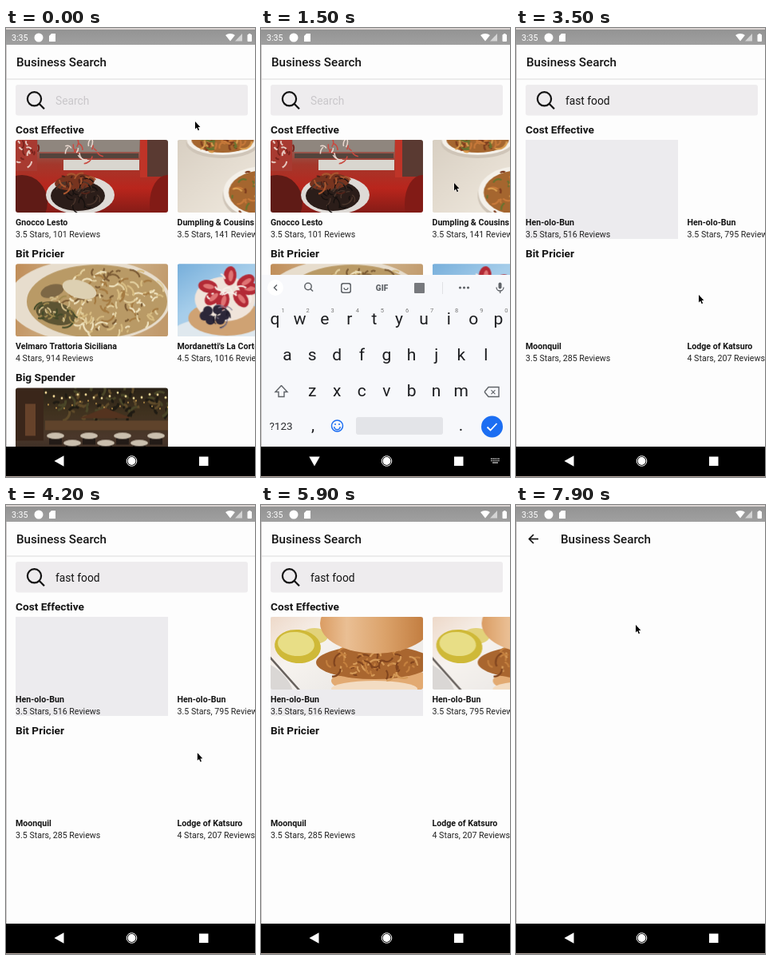
An HTML page with a canvas for the animation above (8000 ms loop, 312 by 562 pixels).

```html
<!DOCTYPE html>
<html lang="en">
<head>
<meta charset="utf-8">
<title>Business Search</title>
<style>
html, body { margin: 0; width: 100%; height: 100%; overflow: hidden; background: #fdfdfd; }
canvas { display: block; width: 312px; height: 562px; }
</style>
</head>
<body>
<canvas id="stage" width="312" height="562"></canvas>
<script>
let c = document.getElementById('stage').getContext('2d');
const LOOP = 8000;
const QUERY = 'fast food';
const INK = '#141414', GRAY = '#5f6368', BLUE = '#1c6ef2', PAGE = '#fdfdfd';
const PHOTO_W = 191, PHOTO_H = 91;
const CARD_X = [12, 214.5], ROW_TOP = 140, ROW_STEP = 155.2;

// Moments in ms.
const KEYBOARD_IN = 800, TYPING = 1530, KEYBOARD_OUT = 2450;
const NEW_RESULTS = 3100, PHOTOS_LOADED = 4300, PAGE_CHANGE = 7400;

const clamp = v => Math.max(0, Math.min(1, v));
const ramp = (t, from, to) => clamp((t - from) / (to - from));
const ease = v => v * v * (3 - 2 * v);
const repeat = (n, fn) => { for (let i = 0; i < n; i++) fn(i); };

function rect(x, y, w, h, color, radius = 0) {
  c.fillStyle = color;
  c.beginPath();
  c.roundRect(x, y, w, h, radius);
  c.fill();
}
function blob(x, y, rx, ry, color, angle = 0) {
  c.fillStyle = color;
  c.beginPath();
  c.ellipse(x, y, rx, ry, angle, 0, 7);
  c.fill();
}
function dot(x, y, r, color) {
  blob(x, y, r, r, color);
}
function trace(points) {
  c.beginPath();
  for (let i = 0; i < points.length; i += 2) c.lineTo(points[i], points[i + 1]);
}
function poly(color, ...points) {
  c.fillStyle = color;
  trace(points);
  c.fill();
}
function line(color, width, ...points) {
  c.strokeStyle = color;
  c.lineWidth = width;
  trace(points);
  c.stroke();
}
function ring(x, y, r, color, width, from = 0, to = 7) {
  c.strokeStyle = color;
  c.lineWidth = width;
  c.beginPath();
  c.arc(x, y, r, from, to);
  c.stroke();
}
function text(s, x, y, size, weight = 400, color = INK, align = 'left') {
  c.font = `${weight} ${size}px Roboto, sans-serif`;
  c.fillStyle = color;
  c.textAlign = align;
  c.fillText(s, x, y);
}
function fade(x, y, ...colors) {
  const g = c.createLinearGradient(0, 0, x, y);
  colors.forEach((color, i) => g.addColorStop(i / (colors.length - 1), color));
  return g;
}
function seeded(seed) {
  return () => (seed = (seed * 16807) % 2147483647) / 2147483647;
}
// Loose curls scattered inside an ellipse.
function strands(count, x, y, rx, ry, colors, width) {
  const rnd = seeded(count * 31 + x);
  repeat(count, i => {
    const a = rnd() * 6.3, d = Math.sqrt(rnd()), start = rnd() * 6.3;
    ring(x + Math.cos(a) * d * rx, y + Math.sin(a) * d * ry, 3 + rnd() * 9,
      colors[i % colors.length], width, start, start + 0.8 + rnd());
  });
}
function backdrop(...args) {
  rect(-9, -9, PHOTO_W + 18, PHOTO_H + 18, fade(...args));
}

const photoScenes = {
  redTable() {
    backdrop(0, PHOTO_H, '#8a756c', '#a3382c', '#b9251c', '#851c17');
    rect(28, -9, 127, 24, '#8f867e');
    rect(30, 17, 124, 6, '#54443c');
    rect(60, 25, 95, 13, '#d9d6cf');
    rect(-9, -9, 36, 48, '#a83a31');
    strands(16, 10, 14, 14, 16, ['#e5c6bd', '#7a241d'], 2);
    strands(16, 88, 10, 26, 9, ['#c94a40', '#ead9d0'], 1.5);
    rect(165, -9, 36, 55, '#5a3a32');
    rect(156, -9, 9, 56, '#bf3428');
    blob(8, 78, 32, 34, '#5f1b16');
    blob(190, 80, 22, 36, '#821b16');
    blob(81, 69, 43, 24, '#dedad6');
    blob(78, 70, 34, 19, '#2b1d19');
    blob(74, 53, 25, 10, '#77341f', -0.1);
    strands(30, 78, 70, 26, 14, ['#4b362c', '#17110f'], 1.4);
    strands(16, 74, 53, 20, 7, ['#a8562f', '#4e2319'], 2);
  },
  beigeBowls() {
    backdrop(80, PHOTO_H, '#d8cfc2', '#eee7dc');
    const bowl = (x, y, rx, ry) => {
      blob(x, y + 4, rx + 1, ry, '#cfc5b8');
      blob(x, y, rx, ry, '#f4f0e9');
      blob(x, y, rx * 0.87, ry * 0.84, '#a5662f');
      strands(40, x, y, rx * 0.74, ry * 0.68, ['#d99d50', '#68732f', '#7d3c1e', '#c7793a'], 2.2);
    };
    bowl(57, 0, 45, 19);
    bowl(108, 66, 50, 33);
  },
  creamyPasta() {
    backdrop(PHOTO_W, 40, '#c08d58', '#d5bf9b', '#c19a6c');
    blob(92, 46, 102, 52, '#e7ddcd');
    blob(102, 47, 88, 46, '#b99a66');
    strands(150, 112, 48, 72, 38, ['#e2cf9f', '#a57b42', '#d7bc82', '#7d5d36', '#eee1bd'], 2.2);
    blob(50, 62, 25, 14, '#5d5433', 0.25);
    blob(46, 34, 15, 8, '#7d6745', -0.3);
    blob(80, 32, 22, 11, '#ddd0b2', 0.3);
    strands(30, 54, 60, 26, 14, ['#424a28', '#a18a4f', '#d2bd8a'], 2);
  },
  berries() {
    backdrop(60, PHOTO_H, '#77afdb', '#a5cdea', '#bcd7eb');
    blob(70, 84, 74, 18, '#dfe8ee');
    blob(62, 68, 48, 22, '#cfa273');
    blob(60, 44, 38, 28, '#f0e4da');
    repeat(7, i => {
      const a = i * 2.4, x = 64 + 26 * Math.cos(a), y = 31 + 16 * Math.sin(a);
      blob(x, y, 12, 8, '#b32a36', a);
      blob(x + 1, y, 7, 3, '#df7474', a);
    });
    strands(12, 62, 36, 28, 18, ['#f8efe9'], 2);
    repeat(6, i => dot(47 + 13 * Math.cos(i), 64 + 7 * Math.sin(i), 6, '#2c2739'));
    strands(10, 47, 63, 14, 8, ['#857d92', '#1d1a28'], 1.2);
  },
  patio() {
    backdrop(0, PHOTO_H, '#2a2217', '#40321f', '#4a372a', '#332822');
    rect(-9, -9, 44, 75, '#3a261a');
    rect(12, 20, 13, 40, '#66422a');
    strands(70, 118, 22, 70, 22, ['#4a4628', '#1f1b13', '#5f4b2a'], 3);
    rect(37, 41, 164, 12, '#5f432b');
    poly('#54331f', 80, 38, 112, 25, 146, 38);
    repeat(16, i => {
      dot(38 + i * 10, 6 + 7 * Math.abs(Math.sin(i * 0.7)), 1.4, '#ffe6a0');
      dot(41 + i * 10, 21 + 5 * Math.sin(i), 0.9, '#ecb95f');
    });
    repeat(7, i => {
      const x = 50 + i * 21, y = 60 + i % 2 * 9;
      rect(x - 8, y, 16, 11, '#231b17');
      blob(x, y, 11, 4, '#cabfae');
    });
  },
  sandwich() {
    backdrop(70, PHOTO_H, '#eed9c9', '#f7f3ef', '#eeebe8');
    blob(55, 24, 17, 10, '#e2d27a');
    blob(34, 37, 29, 21, '#cfb938', 0.1);
    blob(32, 34, 23, 15, '#e8de86', 0.1);
    blob(2, 84, 34, 18, '#dad7d5', 0.8);
    line('#67615d', 2.5, -3, 48, 38, 94);
    blob(140, 80, 64, 17, '#e2aa72');
    blob(130, 90, 54, 10, '#f3dcc2');
    blob(130, 57, 73, 21, '#a9662f');
    strands(60, 130, 59, 62, 14, ['#c4803f', '#81451f', '#d59a58'], 2.2);
    blob(132, 8, 70, 38, fade(PHOTO_W, 0, '#cf8a4a', '#d48e4e', '#eabf94', '#dba26a', '#c37e41'));
  }
};

function renderPhoto(scene) {
  const stage = c, canvas = document.createElement('canvas');
  canvas.width = PHOTO_W;
  canvas.height = PHOTO_H;
  c = canvas.getContext('2d');
  c.filter = 'blur(0.7px)';
  scene();
  c = stage;
  return canvas;
}
const photos = Object.fromEntries(
  Object.entries(photoScenes).map(([name, scene]) => [name, renderPhoto(scene)]));

function card(column, row, photo, name, meta) {
  const x = CARD_X[column], y = ROW_TOP + row * ROW_STEP;
  if (photo) {
    c.save();
    c.beginPath();
    c.roundRect(x, y, PHOTO_W, PHOTO_H, 3);
    c.clip();
    c.drawImage(photos[photo], x, y);
    c.restore();
  }
  text(name, x, y + 106.7, 10.63, 700);
  text(meta, x, y + 121.5, 10.63, 400, '#222');
}

function results(t) {
  const titles = ['Cost Effective', 'Bit Pricier', 'Big Spender'];
  titles.slice(0, t < NEW_RESULTS ? 3 : 2).forEach((title, row) =>
    text(title, 12, ROW_TOP - 8 + row * ROW_STEP, 13.66, 700));
  if (t < NEW_RESULTS) {
    card(0, 0, 'redTable', 'Gnocco Lesto', '3.5 Stars, 101 Reviews');
    card(1, 0, 'beigeBowls', 'Dumpling & Cousins', '3.5 Stars, 141 Reviews');
    card(0, 1, 'creamyPasta', 'Velmaro Trattoria Siciliana', '4 Stars, 914 Reviews');
    card(1, 1, 'berries', "Mordanetti's La Corte", '4.5 Stars, 1016 Reviews');
    card(0, 2, 'patio', '', '');
  } else {
    const photo = t > PHOTOS_LOADED && 'sandwich';
    card(0, 0, photo, 'Hen-olo-Bun', '3.5 Stars, 516 Reviews');
    card(1, 0, photo, 'Hen-olo-Bun', '3.5 Stars, 795 Reviews');
    card(0, 1, null, 'Moonquil', '3.5 Stars, 285 Reviews');
    card(1, 1, null, 'Lodge of Katsuro', '4 Stars, 207 Reviews');
  }
}

function magnifier(x, y, r, color, width) {
  ring(x, y, r, color, width);
  line(color, width, x + r * 0.7, y + r * 0.7, x + r * 1.45, y + r * 1.45);
}

function searchScreen(t) {
  rect(0, 21, 312, 503, PAGE);
  text('Business Search', 13, 48.3, 15.2, 500);
  rect(0, 63, 312, 2, '#ececec');
  rect(12, 71, 291, 38.5, '#eeecee', 3);
  magnifier(35.5, 88.8, 8.6, '#111', 2.2);
  const typed = QUERY.slice(0, Math.ceil((t - TYPING) / 90) * (t > TYPING));
  text(typed || 'Search', 62, 95.7, 13.75, 400, typed ? INK : '#c9c7ca');
  if (t > KEYBOARD_OUT) rect(12, ROW_TOP, PHOTO_W, 124, t < NEW_RESULTS ? '#f3f2f3' : '#ecebee');
  results(t);
}

function detailScreen(progress) {
  c.save();
  c.globalAlpha = progress;
  c.translate(0, 40 * (1 - progress));
  rect(0, 21, 312, 503, PAGE);
  line('#111', 1.7, 28, 42.5, 17, 42.5);
  line('#111', 1.7, 22, 37, 16.5, 42.5, 22, 48);
  text('Business Search', 56, 48.3, 15.2, 500);
  c.restore();
}

function toolbar(y) {
  dot(18, y, 10, '#fff');
  line(GRAY, 1.5, 20, y - 3.5, 16.5, y, 20, y + 3.5);
  magnifier(59, y - 1.5, 4.2, GRAY, 1.5);
  rect(100, y - 6, 13, 13, GRAY, 3);
  rect(101.5, y - 4.5, 10, 10, '#f7f8fb', 2);
  ring(106.5, y, 2.5, GRAY, 1.2, 0, Math.PI);
  text('GIF', 151.5, y + 3.5, 10, 900, GRAY, 'center');
  rect(192, y - 6, 13, 13, '#77797d', 1);
  rect(227, y - 7, 1, 15, '#e0e1e4');
  repeat(3, i => dot(249.5 + i * 5, y, 1.6, GRAY));
  rect(297.5, y - 6.5, 4, 8, GRAY, 2);
  ring(299.5, y - 0.5, 4.5, GRAY, 1.3, 0, Math.PI);
  rect(299, y + 4, 1.3, 3, GRAY);
}

function keyboard(open) {
  const key = (s, x, y) => text(s, x, y, 21, 400, '#1c1d20', 'center');
  const pitch = 31.1;
  c.save();
  c.translate(0, 215 * (1 - open));
  rect(0, 309, 312, 215, '#f7f8fb');
  toolbar(325);
  ['qwertyuiop', 'asdfghjkl', 'zxcvbnm'].forEach((keys, row) =>
    [...keys].forEach((s, i) => key(s, 17.5 + row * row * pitch / 2 - (row > 1 ? pitch / 2 : 0) + i * pitch, 371 + row * 45)));
  repeat(10, i => text((i + 1) % 10, 27.5 + i * pitch, 355.5, 7.5, 400, '#777', 'center'));

  line(GRAY, 1.4, 25.5, 447.5, 18, 455.5, 22, 455.5, 22, 461.5, 29, 461.5, 29, 455.5, 33, 455.5, 25.5, 447.5);
  line(GRAY, 1.4, 280, 455.5, 285, 449.5, 298, 449.5, 298, 461.5, 285, 461.5, 280, 455.5);
  text('×', 291, 460, 13, 400, GRAY, 'center');

  text('?123', 25, 503, 13.5, 400, '#2b2c30', 'center');
  key(',', 65, 504);
  key('.', 250.5, 504);
  ring(95.5, 498, 7, BLUE, 1.5);
  ring(95.5, 499, 3.7, BLUE, 1.5, 0, Math.PI);
  repeat(2, i => dot(93 + i * 5, 496, 1, BLUE));
  rect(119, 487, 109, 22, '#e3e4e8', 3);
  dot(289.5, 499, 13.5, BLUE);
  line('#fff', 1.8, 283.5, 499.5, 287.5, 503.5, 295.5, 495);
  c.restore();
}

function statusBar() {
  rect(0, 0, 312, 2, '#d8d2d0');
  rect(0, 2, 312, 19, fade(0, 21, '#929292', '#a0a0a0'));
  text('3:35', 7, 16, 10.63, 400, '#fff');
  dot(41, 12, 5.5, '#fff');
  poly('#fff', 57, 7, 62, 7, 62, 17, 54, 17, 54, 10);
  c.fillStyle = '#fff';
  c.beginPath();
  c.moveTo(281, 16.5);
  c.arc(281, 16.5, 9.5, -2.25, -0.9);
  c.fill();
  poly('#d4d4d4', 296, 7, 296, 16.5, 287, 16.5);
  rect(302.5, 8, 5.5, 9, '#fff', 1);
  rect(304, 7, 2.5, 2, '#fff');
}

function navigationBar(keyboardOpen) {
  rect(0, 524, 312, 37, '#000');
  rect(0, 561, 312, 1, '#b9aaa2');
  c.save();
  c.translate(67, 542);
  if (keyboardOpen) c.rotate(-Math.PI / 2);
  poly('#fff', -6.5, 0, 5.5, -6.7, 5.5, 6.7);
  c.restore();
  if (keyboardOpen) {
    repeat(10, i => rect(288 + i % 5 * 2.3, 538.5 + Math.floor(i / 5) * 2.4, 1.4, 1.4, '#ddd'));
    rect(290, 543.5, 7, 1.2, '#ddd');
  }
  ring(157.5, 542, 6.3, '#fff', 1);
  dot(157.5, 542, 4.9, '#fff');
  rect(242, 536.5, 11.5, 11.5, '#fff');
}

// Each move: start, end, then where the tip comes to rest.
const pointerMoves = [
  [100, 600, 236, 93],
  [900, 1400, 242, 194],
  [2750, 3400, 229, 334],
  [3900, 4900, 279, 225],
  [5450, 5700, 320, 195],
  [5900, 6550, 283, 341],
  [6600, 6850, 204, 337],
  [6900, 7350, 150, 150]
];
function pointer(t) {
  let x = 237, y = 117;
  for (const [from, to, restX, restY] of pointerMoves) {
    const k = ease(ramp(t, from, to));
    x += (restX - x) * k;
    y += (restY - y) * k;
  }
  c.save();
  c.translate(x, y);
  const arrow = [0, 0, 0, 9.5, 2.1, 7.6, 3.7, 11.2, 5.1, 10.6, 3.6, 7.1, 6.4, 7];
  line('#fff', 1, ...arrow);
  poly('#000', ...arrow);
  c.restore();
}

function draw(t) {
  const open = ease(ramp(t, KEYBOARD_IN, KEYBOARD_IN + 200)) - ease(ramp(t, KEYBOARD_OUT, KEYBOARD_OUT + 150));
  searchScreen(t);
  detailScreen(ease(ramp(t, PAGE_CHANGE, PAGE_CHANGE + 250)));
  if (open > 0) keyboard(open);
  statusBar();
  navigationBar(open > 0);
  rect(0, 21, 1, 503, '#cbc8c8');
  pointer(t);
}

const begin = performance.now();
function tick() {
  draw((performance.now() - begin) % LOOP);
  requestAnimationFrame(tick);
}
tick();
</script>
</body>
</html>
```
